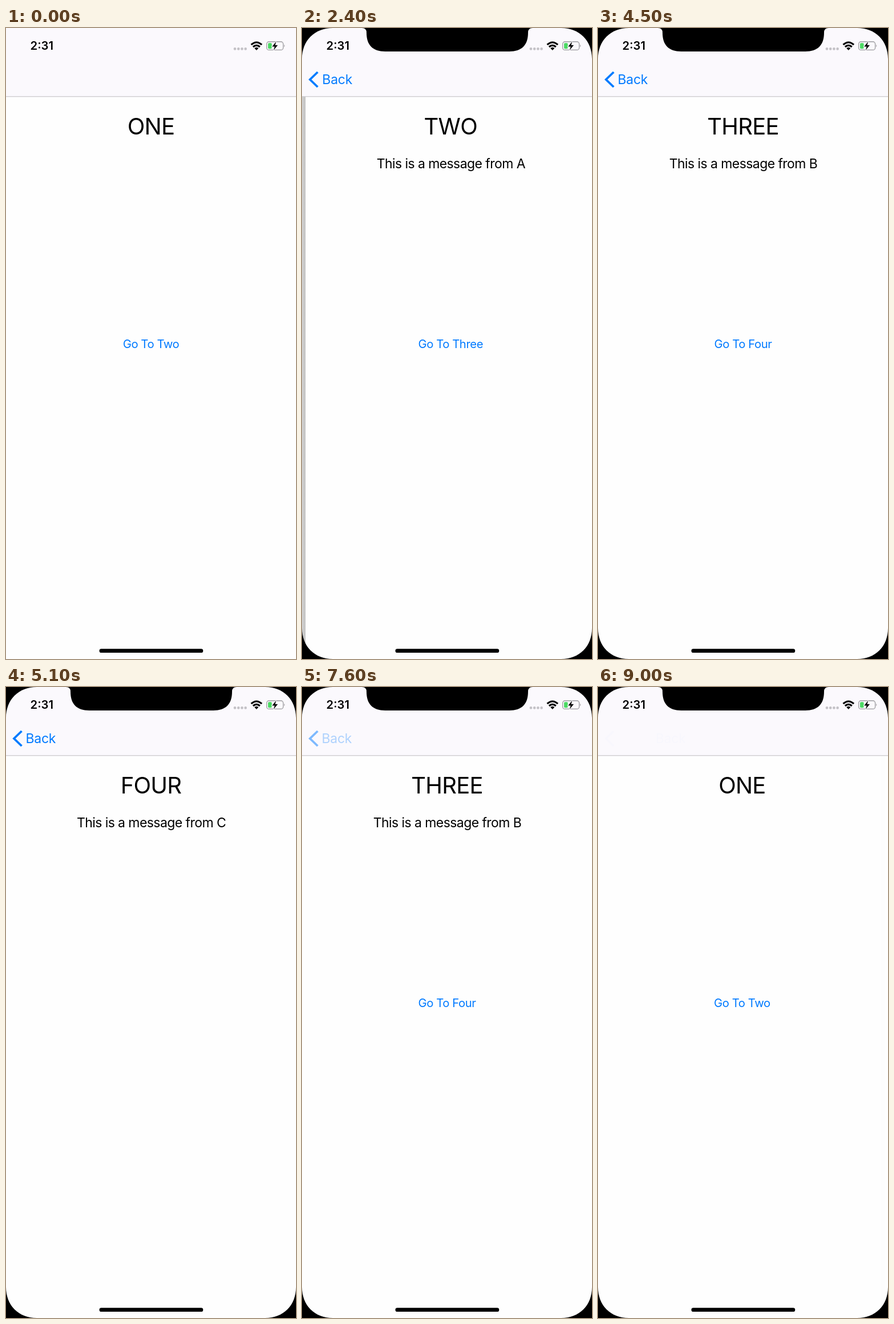
Animation, 508 px wide and 1102 px high, one loop 9100 ms. Source, as an HTML page:

```html
<!DOCTYPE html>
<html lang="en">
<head>
<meta charset="utf-8">
<title>Navigation stack</title>
<style>
  html, body { margin: 0; width: 100%; height: 100%; overflow: hidden; background: #fff; }
  svg { display: block; width: 100vw; height: 100vh; }
  text { font-family: Inter, "Liberation Sans", sans-serif; font-optical-sizing: none; }
  .title { font-size: 40px; letter-spacing: -0.8px; text-anchor: middle; }
  .message { font-size: 23px; letter-spacing: -0.57px; text-anchor: middle; }
  .button { font-size: 20.3px; letter-spacing: -0.45px; text-anchor: middle; fill: #007aff; }
  .back { font-size: 23px; letter-spacing: -0.25px; fill: #007aff; }
  .clock { font-size: 20.3px; font-weight: 600; }
</style>
</head>
<body>
<svg viewBox="0 0 508 1102" preserveAspectRatio="none">
  <defs>
    <linearGradient id="edge">
      <stop offset="0" stop-color="#000" stop-opacity="0"/>
      <stop offset="0.3" stop-color="#000" stop-opacity="0.09"/>
      <stop offset="1" stop-color="#000" stop-opacity="0.16"/>
    </linearGradient>
  </defs>
  <g id="pages"></g>

  <rect width="508" height="119" fill="#fbf9fd"/>
  <rect y="119" width="508" height="1.4" fill="#cfced1"/>
  <polyline id="chevron" points="27.5,77 14,90 27.5,103" fill="none" stroke="#007aff" stroke-width="3.8"/>
  <g id="labels"></g>

  <text class="clock" x="42.5" y="38.4">2:31</text>
  <g fill="#c3c1c6">
    <circle cx="401" cy="36.4" r="2.3"/><circle cx="407.2" cy="36.4" r="2.3"/>
    <circle cx="413.4" cy="36.4" r="2.3"/><circle cx="419.6" cy="36.4" r="2.3"/>
  </g>
  <g fill="none" stroke="#000" stroke-width="3.1">
    <path d="M429.5 29.2Q438.8 20.8 448.1 29.2"/>
    <path d="M432.8 33Q438.8 27.6 444.8 33"/>
    <path d="M435.2 35.2Q438.8 32.2 442.4 35.2L438.8 38.9Z" fill="#000" stroke="none"/>
  </g>
  <rect x="456.6" y="24" width="29" height="14.4" rx="4" fill="none" stroke="#9b9a9e" stroke-width="1.3"/>
  <path d="M487.2 28.7q2.2 2.4 0 4.8z" fill="#9b9a9e"/>
  <rect x="459" y="26.2" width="6.6" height="10" rx="1.6" fill="#4cd964"/>
  <path d="M473.2 23.8L466.2 32.4H470.6L468.8 38.8L476 30.1H471.5Z" fill="#000" stroke="#fbf9fd" stroke-width="1.6" paint-order="stroke"/>
  <rect x="163.5" y="1084.3" width="181.8" height="6.8" rx="3.4"/>
  <g id="bezel">
    <path d="M105 0Q113 0 113 8C113 30 124 41 146 41H363C385 41 396 30 396 8Q396 0 404 0Z"/>
    <path d="M0 0H54C22 0 0 22 0 54ZM508 0V54C508 22 486 0 454 0Z"/>
    <path d="M0 1102V1048C0 1080 22 1102 54 1102ZM508 1102H454C486 1102 508 1080 508 1048Z"/>
  </g>
</svg>
<script>
const WIDTH = 508, LOOP = 9100, TICK = 100;
const SCREENS = [
  { title: "ONE", button: "Go To Two" },
  { title: "TWO", message: "This is a message from A", button: "Go To Three" },
  { title: "THREE", message: "This is a message from B", button: "Go To Four" },
  { title: "FOUR", message: "This is a message from C" }
];
// Each move: touch time, slide start, depth before and after.
const MOVES = [
  { press: 2000, start: 2050, from: 0, to: 1 },
  { press: 3400, start: 3450, from: 1, to: 2 },
  { press: 4600, start: 4650, from: 2, to: 3 },
  { press: 6500, start: 6645, from: 3, to: 2 },
  { press: 7600, start: 7745, from: 2, to: 1 },
  { press: 8600, start: 8640, from: 1, to: 0 }
];

const byId = id => document.getElementById(id);
const set = (node, attrs) => {
  for (const key in attrs) node.setAttribute(key, attrs[key]);
  return node;
};
const add = (parent, tag, attrs, content = "") => {
  const node = document.createElementNS("http://www.w3.org/2000/svg", tag);
  node.textContent = content;
  return parent.appendChild(set(node, attrs));
};

const pages = SCREENS.map(({ title, message, button }) => {
  const group = add(byId("pages"), "g", {});
  const shadow = add(group, "rect", { x: -8, y: 120, width: 8, height: 982, fill: "url(#edge)" });
  add(group, "rect", { width: WIDTH, height: 1102, fill: "#fefefe" });
  add(group, "text", { class: "title", x: 254, y: 186 }, title);
  if (message) add(group, "text", { class: "message", x: 254.5, y: 245 }, message);
  const action = button && add(group, "text", { class: "button", x: 254, y: 558.6 }, button);
  const dim = add(group, "rect", { width: WIDTH, height: 1102 });
  return { group, shadow, action, dim };
});
const labels = SCREENS.map((_, i) =>
  i ? add(byId("labels"), "text", { class: "back", x: 34.5, y: 98 }, "Back") : null);

// Critically damped spring, settled after half a second.
function spring(ms) {
  if (ms <= 0) return 0;
  if (ms >= 445) return 1;
  const x = 18.26 * ms / 1000;
  return 1 - (1 + x) * Math.exp(-x);
}

function draw(t) {
  const move = MOVES.filter(m => m.press <= t).pop();
  const depth = move ? move.from + (move.to - move.from) * spring(t - move.start) : 0;
  const pushing = move && move.to > move.from;
  const backHeld = move && !pushing && t < move.start;

  pages.forEach(({ group, shadow, action, dim }, i) => {
    const d = depth - i;
    const x = d > 0 ? -0.3 * WIDTH * d : -WIDTH * d;
    set(group, { transform: `translate(${x} 0)`, display: Math.abs(d) < 1 ? "inline" : "none" });
    set(shadow, { opacity: d < 0 ? Math.max(0, Math.min(1, 4 * (1 + d))) : 0 });
    set(dim, { opacity: 0.1 * Math.max(0, d) });
    if (action) set(action, { opacity: pushing && move.from === i ? 0.3 : 1 });
  });

  labels.forEach((label, i) => {
    if (!label) return;
    const d = depth - i;
    const alpha = Math.max(0, d > 0 ? 1 - 1.3 * d * d : 1 + d);
    set(label, {
      transform: `translate(${d > 0 ? -60 * d : -67 * d} 0)`,
      opacity: alpha * (backHeld ? 0.3 : 1)
    });
  });

  set(byId("chevron"), { opacity: Math.min(1, depth) * (backHeld ? 0.5 : 1) });
  set(byId("bezel"), { display: t >= 2000 ? "inline" : "none" });
}

const began = performance.now();
function frame() {
  const t = (performance.now() - began) % LOOP;
  draw(Math.floor(t / TICK) * TICK);
  requestAnimationFrame(frame);
}
frame();
</script>
</body>
</html>
```
